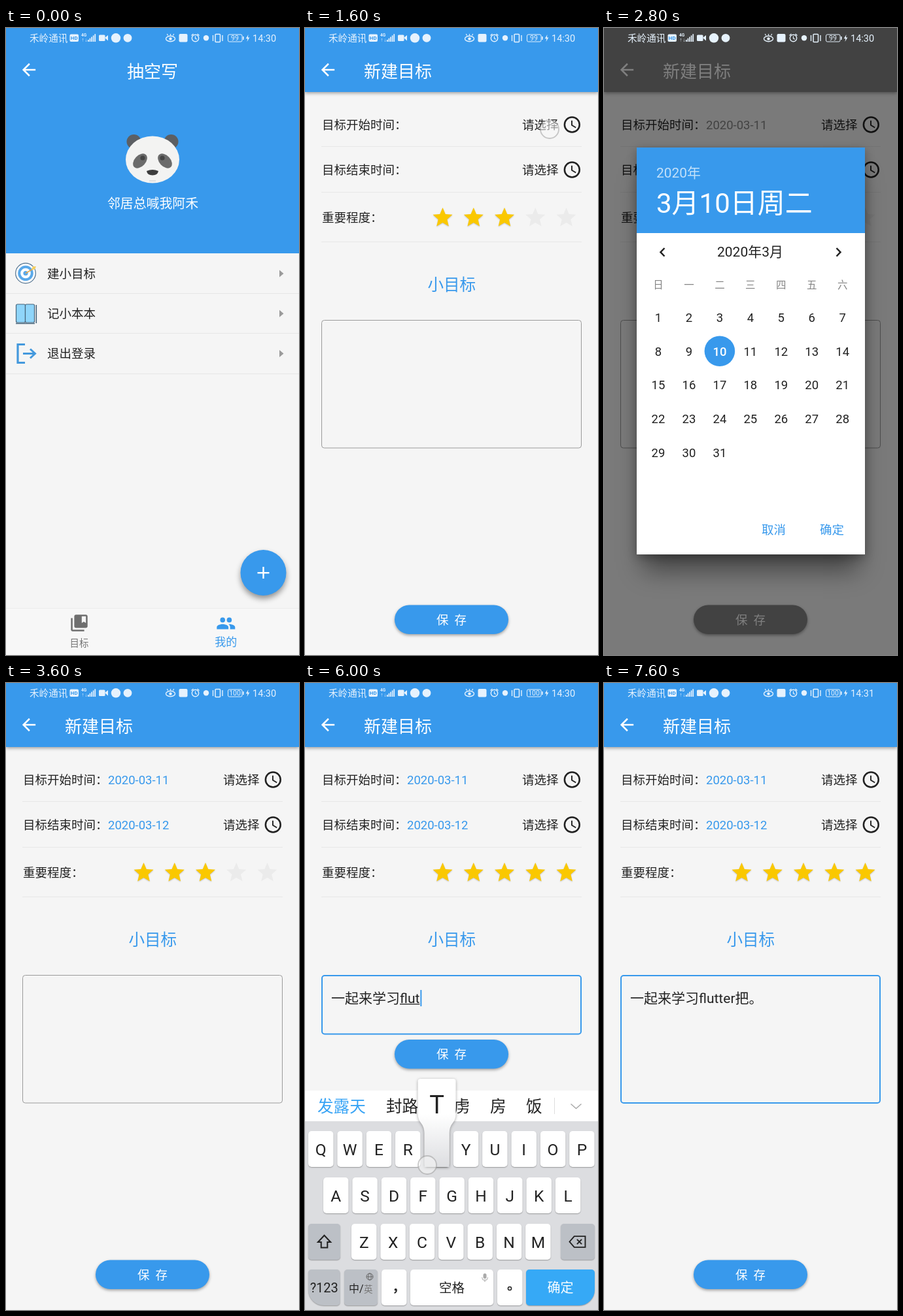
Animation of 448 by 960 pixels, one loop 8000 ms. Source, as an HTML page with a canvas:

```html
<!DOCTYPE html>
<html lang="zh-CN">
<head>
<meta charset="utf-8">
<title>新建目标</title>
<style>
html, body { margin: 0; width: 100%; height: 100%; overflow: hidden; background: #f5f5f5; }
canvas { display: block; width: 448px; height: 960px; }
</style>
</head>
<body>
<canvas id="stage" width="448" height="960"></canvas>
<script>
const W = 448, H = 960, STEP = 400, STEPS = 20;
const BLUE = '#3899ec', PAGE = '#f5f5f5', INK = '#222';
const FONT = '"Roboto","Noto Sans CJK SC","Noto Sans CJK",sans-serif';
const stage = document.getElementById('stage').getContext('2d');
let g = stage;

const ICON = {
  back: 'M20 11H7.83l5.59-5.59L12 4l-8 8 8 8 1.41-1.41L7.83 13H20z',
  books: 'M4 6H2v14c0 1.1.9 2 2 2h14v-2H4zM20 2H8c-1.1 0-2 .9-2 2v12c0 1.1.9 2 2 2h12c1.1 0 2-.9 2-2V4c0-1.1-.9-2-2-2zm0 10l-2.5-1.5L15 12V4h5z',
  people: 'M16 11a3 3 0 1 0-3-3 3 3 0 0 0 3 3zM8 11a3 3 0 1 0-3-3 3 3 0 0 0 3 3zm0 2c-2.33 0-7 1.17-7 3.5V19h14v-2.5C15 14.17 10.33 13 8 13zm8 0c-.29 0-.62.02-.97.05C16.19 13.89 17 15.02 17 16.5V19h6v-2.5c0-2.33-4.67-3.5-7-3.5z',
  clock: 'M12 2a10 10 0 1 0 0 20a10 10 0 1 0 0-20zM12 4a8 8 0 1 1 0 16a8 8 0 1 1 0-16zM12.5 7H11v6l5.25 3.15.75-1.23-4.5-2.67z',
  star: 'M12 17.27L18.18 21l-1.64-7.03L22 9.24l-7.19-.61L12 2 9.19 8.63 2 9.24l5.46 4.73L5.82 21z',
  shift: 'M12 3.5L4 12h4v7h8v-7h4z',
  erase: 'M8 5h14v14H8L2 12zM11.5 9l6 6M17.5 9l-6 6'
};
for (const k in ICON) ICON[k] = new Path2D(ICON[k]);

function icon(name, x, y, scale, color, line) {
  g.save();
  g.translate(x, y);
  g.scale(scale, scale);
  g.translate(-12, -12);
  g.fillStyle = g.strokeStyle = color;
  if (line) { g.lineWidth = line; g.stroke(ICON[name]); }
  else g.fill(ICON[name], 'evenodd');
  g.restore();
}

// y is the optical centre of the glyphs
function text(s, x, y, size, color = INK, align = 'left', weight = 400) {
  g.font = `${weight} ${size}px ${FONT}`;
  g.textAlign = align;
  g.fillStyle = color;
  g.fillText(s, x, y + size * 0.37);
}

function rect(x, y, w, h, color) {
  g.fillStyle = color;
  g.fillRect(x, y, w, h);
}

function round(x, y, w, h, r, fill, stroke, line = 1) {
  g.beginPath();
  g.roundRect(x, y, w, h, r);
  paint(fill, stroke, line);
}

function oval(x, y, rx, ry, fill, stroke, line = 1, turn = 0) {
  g.beginPath();
  g.ellipse(x, y, rx, ry, turn, 0, 7);
  paint(fill, stroke, line);
}

function disc(x, y, r, fill, stroke, line) { oval(x, y, r, r, fill, stroke, line); }

function poly(pts, fill, stroke, line) {
  g.beginPath();
  for (let i = 0; i < pts.length; i += 2) g.lineTo(pts[i], pts[i + 1]);
  if (fill) g.closePath();
  paint(fill, stroke, line);
}

function paint(fill, stroke, line = 1) {
  if (fill) { g.fillStyle = fill; g.fill(); }
  if (stroke) { g.strokeStyle = stroke; g.lineWidth = line; g.stroke(); }
}

function shadow(color, blur, dy, draw) {
  g.save();
  g.shadowColor = color;
  g.shadowBlur = blur;
  g.shadowOffsetY = dy;
  draw();
  g.restore();
}

// Draws a group on its own canvas so that it fades as one
function layer(alpha, dy, draw) {
  const under = g;
  g = new OffscreenCanvas(W, H).getContext('2d');
  draw();
  const img = g.canvas;
  g = under;
  g.save();
  g.globalAlpha = alpha;
  g.drawImage(img, 0, dy);
  g.restore();
}

function statusBar(n) {
  const c = '#e6f2fd';
  text('禾岭通讯', 36, 15.5, 14.6, c);
  round(97.5, 9.5, 13.5, 11.5, 2, c);
  text('HD', 104.2, 15.3, 8, BLUE, 'center', 700);
  text('4G', 115, 11, 6.5, c, 'left', 700);
  text('↑↓', 115, 18, 5, c);
  for (let i = 0; i < 5; i++) rect(125 + i * 2.6, 18 - i * 2.2, 1.7, 3 + i * 2.2, c);
  round(142, 10.5, 9.5, 9.5, 1.5, c);
  poly([151, 15, 156, 11, 156, 19.5], c);
  disc(168, 15.3, 7.2, c);
  disc(186, 15.3, 6.4, c);

  oval(251.5, 16.5, 7, 4.2, null, c, 1.4);
  disc(251.5, 16.5, 2.2, c);
  for (const d of [-1, 0, 1]) poly([251.5 + d * 4, 11.5, 251.5 + d * 5.2, 9], null, c, 1.2);
  round(264.5, 9, 13, 12.5, 2, c);
  disc(289.5, 15.5, 5.2, null, c, 1.4);
  poly([289.5, 12.5, 289.5, 16, 292, 17.2], null, c, 1.2);
  poly([283.5, 11.5, 286.5, 9], null, c, 1.4);
  poly([295.5, 11.5, 292.5, 9], null, c, 1.4);
  disc(306, 15.3, 4.2, c);
  round(320, 9.5, 7.5, 12, 1, null, c, 1.5);
  for (const x of [316.5, 331]) poly([x, 11, x, 20], null, c, 1.4);
  round(339.5, 10, 21.5, 11, 2, null, c, 1);
  rect(362, 13, 1.6, 5, c);
  text(n < 9 ? '99' : '100', 350, 15.6, 10.5, c, 'center');
  poly([370.5, 10, 366.8, 16.2, 369.4, 16.2, 368.5, 21, 372.4, 14.4, 369.8, 14.4], c);
  text(n < 18 ? '14:30' : '14:31', 377, 15.5, 14.5, c);
}

function panda() {
  for (const s of [-1, 1]) disc(224 + s * 28.5, 174, 11, '#5c5f63');
  oval(224, 201.5, 41, 36, '#f3f3f2');
  for (const s of [-1, 1]) {
    oval(224 + s * 19, 203.5, 8.5, 13, '#6b6b6b', null, 1, -s * 0.75);
    disc(224 + s * 15, 199, 3.6, '#454545');
  }
  g.beginPath();
  g.moveTo(215, 219);
  g.quadraticCurveTo(224, 215, 233, 219);
  g.quadraticCurveTo(232, 225.5, 224, 225.5);
  g.quadraticCurveTo(216, 225.5, 215, 219);
  paint('#3d3d3d');
  poly([219, 234, 229, 234], null, '#d9d9d9', 1.5);
}

function profile() {
  rect(0, 0, W, H, PAGE);
  rect(0, 0, W, 345, BLUE);
  icon('back', 35, 64, 1.27, '#fff');
  text('抽空写', 224, 66, 26, '#fff', 'center');
  panda();
  text('邻居总喊我阿禾', 224.5, 269, 19.9, '#fff', 'center');

  ['建小目标', '记小本本', '退出登录'].forEach((label, i) => {
    const y = 376 + i * 61.3;
    text(label, 63, y, 18.5);
    poly([418, y - 5.5, 424.5, y, 418, y + 5.5], '#9b9b9b');
    rect(0, Math.round(y + 30), W, 1, '#e6e6e6');
  });

  disc(30, 375.5, 15.3, '#fff', '#51718d', 1.2);
  disc(30, 375.5, 9.8, null, '#5aa9ea', 4);
  disc(30, 375.5, 3.6, '#5aa9ea');
  poly([30, 375.5, 41, 369], null, '#e3a64c', 1.6);
  poly([39, 370, 41, 365, 46, 365, 44, 369.5], '#f4cf62');

  round(15.5, 423, 14, 28, 2, '#8fd5fa', '#46647b', 1.2);
  round(29.5, 423, 14, 28, 2, '#8fd5fa', '#46647b', 1.2);
  poly([15, 452.5, 44, 452.5], null, '#46647b', 1.4);
  poly([46.3, 424, 46.3, 452], null, '#46647b', 1.6);

  poly([29, 484.5, 18, 484.5, 18, 512.5, 29, 512.5], null, '#4499dd', 3.2);
  poly([26, 498.5, 44, 498.5], null, '#4499dd', 3);
  poly([37, 491.5, 44.5, 498.5, 37, 505.5], null, '#4499dd', 3);

  shadow('rgba(0,0,0,.4)', 9, 5, () => disc(393.5, 834, 35, BLUE));
  rect(384.5, 833, 18, 2.4, '#fff');
  rect(392.3, 825, 2.4, 18, '#fff');

  rect(0, 888, W, 72, '#f7f7f7');
  rect(0, 888, W, 1, '#ececec');
  icon('books', 112, 911, 1.27, '#6f6f6f');
  text('目标', 112, 942, 14.4, '#757575', 'center');
  icon('people', 336.3, 911.5, 1.27, BLUE);
  text('我的', 336.3, 940, 17, BLUE, 'center');
}

function saveButton(y) {
  shadow('rgba(0,0,0,.35)', 4, 2, () => round(137, y, 174, 44.5, 22.2, BLUE));
  text('保  存', 224, y + 22.5, 18.5, '#fff', 'center');
}

function form(f) {
  rect(0, 0, W, H, PAGE);
  shadow('rgba(0,0,0,.35)', 5, 2, () => rect(0, 0, W, 98, BLUE));
  icon('back', 35, 64, 1.27, '#fff');
  text('新建目标', 90, 66, 26, '#fff');

  [['目标开始时间：', f.start], ['目标结束时间：', f.end]].forEach(([label, date], i) => {
    const y = 148 + i * 69;
    text(label, 26, y, 18.5);
    if (date) text(date, 156, y, 18.5, BLUE);
    text('请选择', 332, y, 18.5);
    icon('clock', 408.3, y, 1.27, INK);
  });
  text('重要程度：', 26, 290, 18.5);
  for (let i = 0; i < 5; i++) {
    const on = i < f.stars;
    shadow('rgba(0,0,0,.22)', on ? 2 : 0, on ? 1 : 0, () =>
      icon('star', 210.5 + i * 47.25, 290, 1.5, on ? '#fac800' : '#ebebeb'));
  }
  for (const y of [181, 251, 327]) rect(25, y, 398, 1, '#e7e7e7');
  text('小目标', 224.3, 393, 24.6, BLUE, 'center');

  const h = f.keys ? 90 : 195.5;
  if (f.focus) round(26, 448, 396, h - 0.5, 4, null, BLUE, 2);
  else round(25.5, 447.5, 397, h, 4, null, '#9a9a9a');
  if (f.text || f.typed) note(f);
  else if (f.keys) rect(40, 470, 2, 25, BLUE);
  saveButton(f.keys ? 546 : 883.5);
}

function note(f) {
  text(f.text + f.typed, 40, 482, 21);
  const a = 40 + g.measureText(f.text).width;
  const b = 40 + g.measureText(f.text + f.typed).width;
  if (f.typed) rect(a, 491, b - a, 1.3, INK);
  if (f.keys) rect(b + 1, 470, 2, 25, BLUE);
}

function dialog(day) {
  shadow('rgba(0,0,0,.45)', 36, 24, () => rect(60, 200, 329, 606, '#fff'));
  shadow('rgba(0,0,0,.3)', 14, 4, () => rect(50, 183, 349, 623, '#fff'));
  rect(50, 183, 349, 131, BLUE);
  text('2020年', 80, 221, 20.9, 'rgba(255,255,255,.7)');
  text(`3月${day}日周${'日一二三四五六'[(day - 1) % 7]}`, 80, 267, 42, '#fff');
  text('2020年3月', 223.5, 342, 21, INK, 'center');
  poly([92.5, 337, 86.5, 343.2, 92.5, 349.5], null, INK, 2.5);
  poly([355.5, 337, 361.5, 343.2, 355.5, 349.5], null, INK, 2.5);
  for (let i = 0; i < 7; i++) text('日一二三四五六'[i], 83 + i * 46.95, 393, 15.5, '#858585', 'center');
  for (let d = 1; d <= 31; d++) {
    const x = 83 + (d - 1) % 7 * 46.95;
    const y = 443 + Math.floor((d - 1) / 7) * 51.7;
    const picked = d === day;
    if (picked) disc(x, y, 23.3, BLUE);
    text(d, x, y, 18.5, picked ? '#fff' : d === 10 ? BLUE : INK, 'center', picked ? 500 : 400);
  }
  text('取消', 241, 768, 18.5, BLUE);
  text('确定', 330, 768, 18.5, BLUE);
}

function key(x, y, w, label, fill = '#fff', size = 24.5, color = INK, r = 5) {
  shadow('rgba(0,0,0,.3)', 1.5, 1, () => round(x, y, w, 55, r, fill));
  if (label) text(label, x + w / 2, y + 28, size, color, 'center');
}

function keyboard(words, pressed) {
  const gray = '#bcc0c6', pitch = 44.35;
  rect(0, 624, W, 47, '#fff');
  const spots = [19, 124, 203, 283, 338];
  words.forEach((w, i) => text(w, spots[i], 648, 24.6, i ? INK : '#36a3f5'));
  rect(381, 635, 1, 25, '#ddd');
  poly([406.5, 644.5, 414.5, 651.5, 422.5, 644.5], null, '#a8a8a8', 1.4);
  rect(0, 671, W, 289, '#dcdde0');

  [['QWERTYUIOP', 5], ['ASDFGHJKL', 28], ['ZXCVBNM', 71]].forEach(([row, x0], r) => {
    [...row].forEach((c, i) => key(x0 + i * pitch, 686 + r * 71, 38.5, c));
  });
  key(5, 828, 49, '', gray);
  icon('shift', 29.5, 856, 1.2, INK, 1.7);
  key(391, 828, 52, '', gray);
  icon('erase', 416.5, 855.5, 1.2, INK, 1.6);
  key(5, 898, 48.5, '?123', gray, 20, INK, [5, 5, 5, 24]);
  key(60, 898, 51, '', gray);
  text('中/', 67, 927, 16);
  text('英', 90, 928, 13.5, '#777');
  disc(99, 909, 5, null, '#666');
  oval(99, 909, 2.2, 5, null, '#666');
  poly([94, 909, 104, 909], null, '#666', 1);
  key(117, 898, 38.5);
  text('，', 133, 925, 20, INK, 'left', 700);
  g.clearRect(0, 0, 0, 0);
  key(161, 898, 127, '空格', '#fff', 19.5);
  round(272.5, 904, 5, 8, 2.5, '#aaa');
  poly([270.5, 910, 272, 914, 278, 914, 279.5, 910], null, '#aaa', 1);
  poly([275, 914, 275, 917], null, '#aaa', 1.2);
  key(294, 898, 38.5);
  disc(313, 927, 2.6, null, INK, 1.5);
  key(338, 898, 105, '确定', '#36a9f6', 20, '#fff', [5, 5, 24, 5]);
  if (pressed) popup(pressed, 5 + 'QWERTYUIOP'.indexOf(pressed) * pitch + 19.2);
}

function popup(label, x) {
  const fill = g.createLinearGradient(0, 660, 0, 742);
  fill.addColorStop(0, '#fff');
  fill.addColorStop(1, '#dcdde0');
  shadow('rgba(0,0,0,.35)', 4, 1, () => {
    g.beginPath();
    g.moveTo(x - 25, 606);
    g.arcTo(x + 29, 606, x + 29, 612, 4);
    g.lineTo(x + 29, 660);
    g.quadraticCurveTo(x + 29, 668, x + 24, 674);
    g.quadraticCurveTo(x + 19, 680, x + 19, 690);
    g.lineTo(x + 19, 741);
    g.lineTo(x - 19, 741);
    g.lineTo(x - 19, 690);
    g.quadraticCurveTo(x - 19, 680, x - 24, 674);
    g.quadraticCurveTo(x - 29, 668, x - 29, 660);
    g.lineTo(x - 29, 610);
    g.arcTo(x - 29, 606, x - 25, 606, 4);
    paint(fill);
  });
  text(label, x, 645, 38, INK, 'center');
}

function touch(x, y) {
  disc(x, y, 14, 'rgba(245,245,245,.55)', 'rgba(150,150,150,.5)', 1.8);
}

// Typing steps: settled text, pinyin being typed, suggestions, pressed key
const TYPING = [
  ['', '', []],
  ['', 'yiqilai', ['一起来', '一起', '一气', '已', '以']],
  ['一起来', 'xuexi', ['学习', '血洗', '学系', '学', '雪']],
  ['一起来学习', 'f', ['发', '放', '分', '非', '服']],
  ['一起来学习', 'flut', ['发露天', '封路', '俘虏', '房', '饭'], 'T'],
  ['一起来学习flutter', '', []],
  ['一起来学习flutter', 'ba', ['把', '吧', '八', '爸', '罢']],
  ['一起来学习flutter把。', '', []]
];

function draw(n) {
  g = stage;
  const typing = TYPING[n - 11];
  const page = {
    start: n >= 6 && '2020-03-11',
    end: n >= 9 && '2020-03-12',
    stars: n >= 10 ? 5 : 3,
    keys: !!typing,
    focus: n >= 11,
    text: typing ? typing[0] : n === 19 ? '一起来学习flutter把。' : '',
    typed: typing ? typing[1] : ''
  };
  if (n < 2) profile();
  if (n === 1) layer(0.5, 40, () => form(page));
  if (n > 1) form(page);

  if (n === 5 || n === 7 || n === 8) {
    g.save();
    g.globalCompositeOperation = 'saturation';
    rect(0, 0, W, H, '#000');
    g.restore();
    rect(0, 0, W, H, 'rgba(0,0,0,.5)');
    dialog(n === 8 ? 12 : 10);
  }
  if (n === 6) {
    rect(0, 0, W, H, 'rgba(0,0,0,.04)');
    layer(0.2, 0, () => {
      dialog(11);
      round(312, 746, 75, 41, 2, 'rgba(0,0,0,.08)');
    });
    touch(351, 778);
  }
  if (typing) keyboard(typing[2], typing[3]);
  if (n === 4) touch(374, 155);
  if (n === 15) touch(187, 738);
  statusBar(n);
}

let shown = -1;
function tick(now) {
  const n = Math.floor(now / STEP) % STEPS;
  if (n !== shown) draw(shown = n);
  requestAnimationFrame(tick);
}
draw(shown = 0);
requestAnimationFrame(tick);
</script>
</body>
</html>
```
